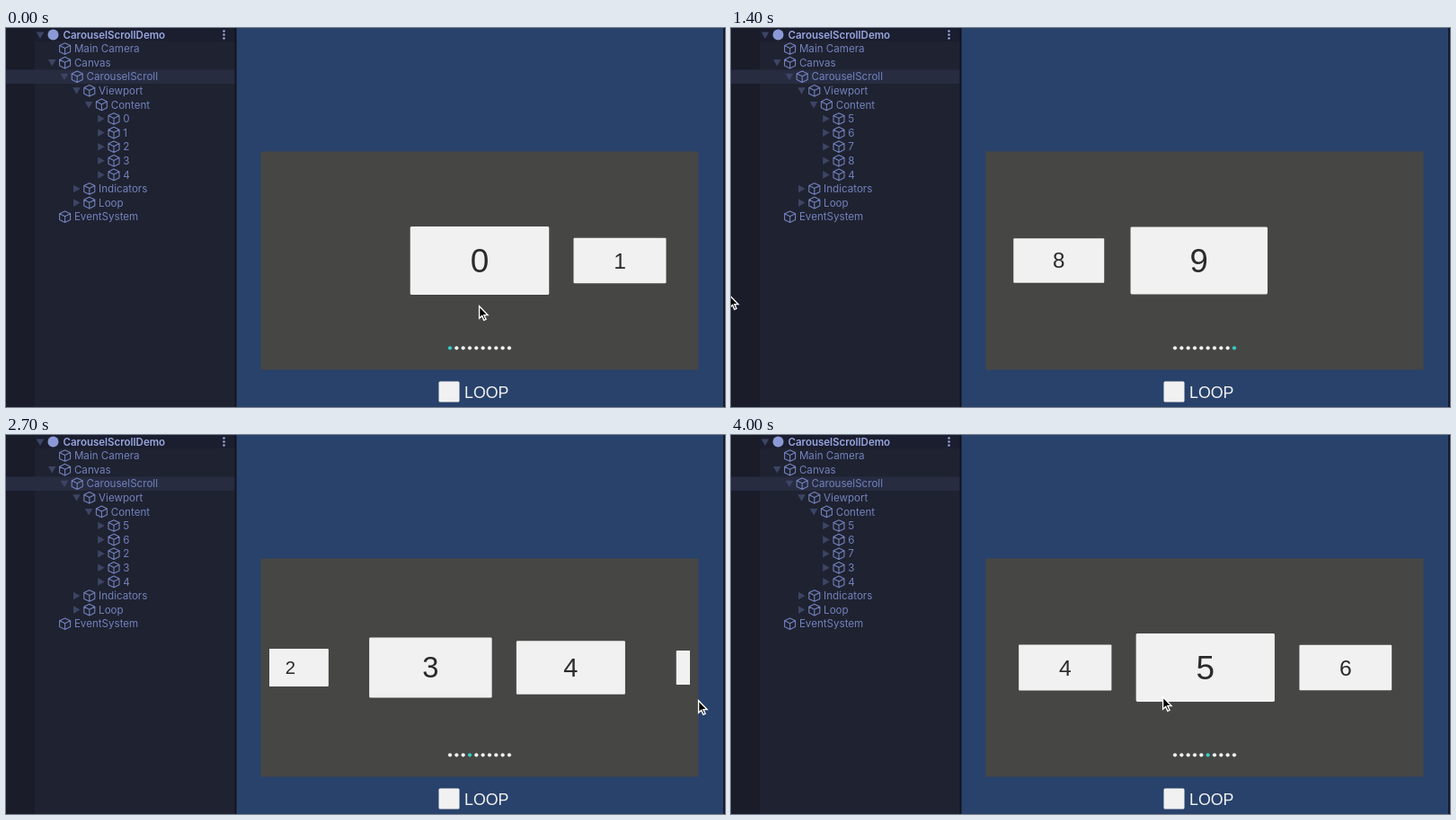
Write an HTML page with a canvas that moves like this. It is 800 px wide and 422 px high and loops after 4100 ms.

```html
<!DOCTYPE html>
<html>
<head>
<meta charset="utf-8">
<style>
html, body { margin: 0; overflow: hidden; background: #1f2230; }
canvas { display: block; }
</style>
</head>
<body>
<canvas id="stage" width="800" height="422"></canvas>
<script>
const ctx = document.getElementById('stage').getContext('2d');
const LOOP = 4100, STEP = 100;
const CENTER = 527, SPACING = 156, MID_Y = 259;

// [time, value...] keys
const SCROLL = [[0, 0], [700, 0], [800, .17], [900, .385], [1000, 1.45], [1100, 3.1],
  [1200, 4.27], [1300, 6.4], [1400, 9.04], [1500, 9.03], [1700, 9], [2000, 9],
  [2100, 8.75], [2200, 8], [2300, 6.8], [2400, 5.48], [2500, 4.59], [2600, 3.8],
  [2700, 3.35], [2800, 3.12], [3000, 3], [3300, 3], [3400, 3.2], [3500, 3.6],
  [3600, 4.03], [3700, 4.55], [3800, 4.86], [3900, 4.96], [4000, 4.995]];
const POINTER = [[0, 526, 309], [300, 602, 330], [600, 672, 346], [700, 668, 345],
  [900, 605.5, 338], [1000, 440, 330], [1100, 182, 315], [1200, 0, 302], [1400, -2, 297],
  [1600, 80, 296], [2000, 410, 291], [2100, 449, 292], [2200, 566, 293], [2300, 742, 293],
  [2400, 792, 293], [2500, 795, 293], [2700, 770, 295], [3100, 609, 300], [3300, 638, 300],
  [3600, 480, 291], [4000, 480, 291]];
const ACTIVE_DOT = [[0, 0], [1200, 9], [2400, 3], [3600, 5]];

const TREE = [['Main Camera', 1], ['Canvas', 1, 'open'], ['CarouselScroll', 2, 'open'],
  ['Viewport', 3, 'open'], ['Content', 4, 'open'], [0, 5, 'shut'], [1, 5, 'shut'],
  [2, 5, 'shut'], [3, 5, 'shut'], [4, 5, 'shut'], ['Indicators', 3, 'shut'],
  ['Loop', 3, 'shut'], ['EventSystem', 1]];

function sample(keys, t, column = 1) {
  const i = keys.findIndex(k => k[0] > t);
  if (i < 0) return keys.at(-1)[column];
  if (i === 0) return keys[0][column];
  const a = keys[i - 1], b = keys[i];
  return a[column] + (b[column] - a[column]) * (t - a[0]) / (b[0] - a[0]);
}

function rect(x, y, w, h, color, radius = 0) {
  ctx.fillStyle = color;
  ctx.beginPath();
  ctx.roundRect(x, y, w, h, radius);
  ctx.fill();
}

function dot(x, y, r, color) {
  ctx.fillStyle = color;
  ctx.beginPath();
  ctx.arc(x, y, r, 0, 7);
  ctx.fill();
}

function text(str, x, y, font, color, align = 'left') {
  ctx.font = font;
  ctx.fillStyle = color;
  ctx.textAlign = align;
  ctx.fillText(str, x, y);
}

function arrow(x, y, open) {
  ctx.save();
  ctx.translate(x, y);
  if (open) ctx.rotate(Math.PI / 2);
  ctx.fillStyle = '#3d4565';
  ctx.fill(new Path2D('M-3.5 -4.3L4 0L-3.5 4.3Z'));
  ctx.restore();
}

function cube(x, y, color) {
  ctx.save();
  ctx.translate(x, y);
  ctx.strokeStyle = color;
  ctx.lineWidth = 1.1;
  ctx.lineJoin = 'round';
  ctx.stroke(new Path2D('M0 -6.3L6 -3.4V3.4L0 6.3L-6 3.4V-3.4ZM-6 -3.4L0 -.4L6 -3.4M0 -.4V6.3'));
  ctx.restore();
}

function drawTree(scroll) {
  rect(0, 0, 255, 422, '#1f2230');
  rect(0, 0, 255, 15, '#1b1e2e');
  rect(0, 0, 32, 422, '#1a1c2a');
  rect(0, 46.5, 255, 15.5, '#272c41');
  rect(254.5, 0, 2, 422, '#11131e');

  arrow(38, 8, true);
  dot(52.5, 7.5, 6, '#8b9ad6');
  text('CarouselScrollDemo', 63.5, 11.5, '600 11.5px Inter, sans-serif', '#98a6df');
  for (const y of [3.5, 7.5, 11.5]) dot(242.5, y, 1.3, '#98a6df');

  // Five pooled items are recycled around the current page
  const page = Math.max(2, Math.round(scroll));
  TREE.forEach(([name, depth, state], row) => {
    const y = 23 + row * 15.6, x = 52 + depth * 13.6;
    let color = '#7282bd';
    if (typeof name === 'number') {
      name += 5 * Math.ceil((page - 2 - name) / 5);
      if (name > 9) {
        name -= 5;
        color = '#4b4f5b';
      }
    }
    if (state) arrow(x - 14.3, y, state === 'open');
    cube(x, y, color);
    text(name, x + 10.3, y + 4.2, '11.6px Inter, sans-serif', color);
  });
}

function drawCard(index, scroll) {
  const x = CENTER + (index - scroll) * SPACING;
  const scale = Math.max(.5, 1 - Math.abs(index - scroll) / 3);
  const w = 154.5 * scale, h = 76 * scale;
  rect(x - w / 2, MID_Y - h / 2, w, h, '#f1f1f1', 1.5 * scale);
  text(index, x, MID_Y + 13 * scale, `${37 * scale}px "Liberation Sans", sans-serif`, '#2b2b2b', 'center');
}

function drawGame(t, scroll) {
  rect(256, 0, 544, 422, '#28426b');
  rect(798, 0, 2, 422, '#15192a');
  rect(283.5, 137.5, 487, 243, '#464745');

  ctx.save();
  ctx.beginPath();
  ctx.rect(293, 138, 468, 242);
  ctx.clip();
  for (let i = 0; i < 10; i++) drawCard(i, scroll);
  ctx.restore();

  const active = ACTIVE_DOT.findLast(k => k[0] <= t)[1];
  for (let i = 0; i < 10; i++) dot(494 + i * 7.33, 356.3, 2.1, i === active ? '#35cdc5' : '#f1f1f1');

  rect(481.5, 393.5, 23, 23, '#f1f1f1', 1.5);
  text('LOOP', 510, 411.5, '17.8px "Liberation Sans", sans-serif', '#f1f1f1');
}

function drawPointer(x, y) {
  ctx.save();
  ctx.translate(x, y);
  const shape = new Path2D('M.6 .8V14.2L3.7 11.4L5.8 16.3L8 15.3L5.9 10.6H10Z');
  ctx.lineWidth = 1.4;
  ctx.strokeStyle = '#fff';
  ctx.fillStyle = '#000';
  ctx.fill(shape);
  ctx.stroke(shape);
  ctx.restore();
}

function frame(now) {
  const t = Math.floor(now % LOOP / STEP) * STEP;
  drawGame(t, sample(SCROLL, t));
  drawTree(sample(SCROLL, t - STEP));
  drawPointer(sample(POINTER, t), sample(POINTER, t, 2));
  requestAnimationFrame(frame);
}
requestAnimationFrame(frame);
</script>
</body>
</html>
```
